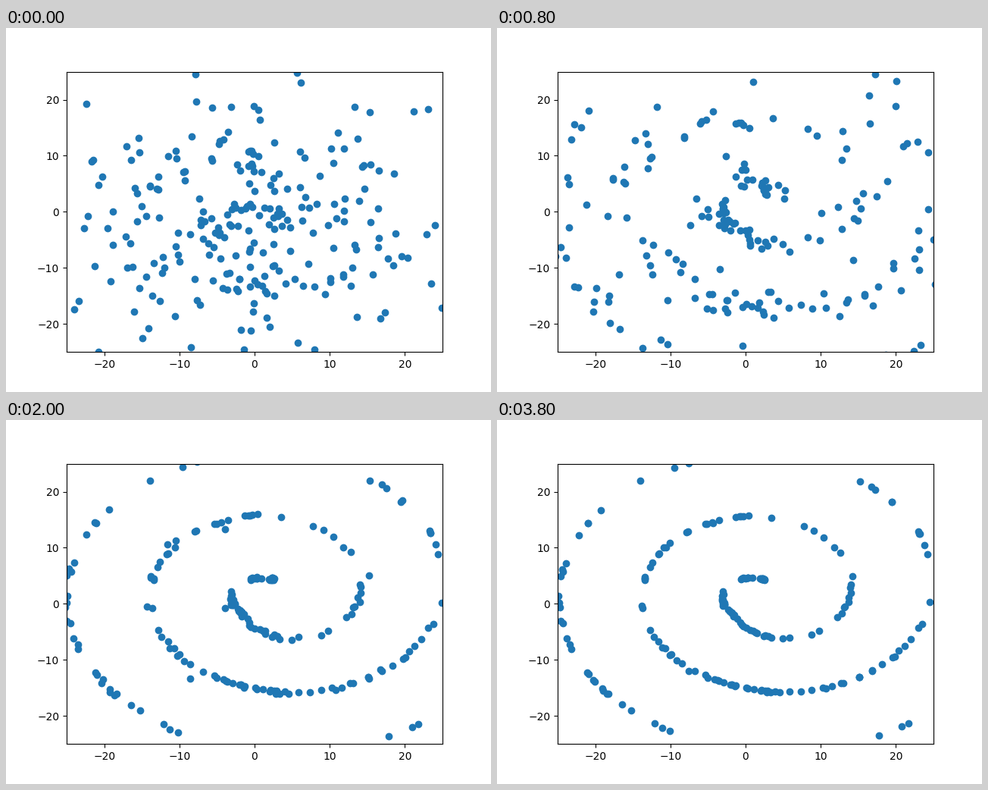
A matplotlib script for the animation above (4 s loop, 640 px wide and 480 px high).

```python
import numpy as np
import matplotlib.pyplot as plt
from matplotlib.animation import FuncAnimation

FRAMES, INTERVAL = 20, 200
COUNT, SIGMA = 250, 12.3


def spiral(n=1400):
    """Valley the dots settle in: a spiral with a skewed wobble in radius."""
    a = np.linspace(np.radians(59), 7.5 * np.pi, n)
    phi = a - np.radians(50)
    r = 10.9 * a / (2 * np.pi) - 0.5 + 4 * np.cos(phi + 0.27 * np.cos(phi))
    return np.column_stack([r * np.cos(a), r * np.sin(a)])


def pull(p, valley):
    """Force towards the nearest valley point, fading out on the ridge."""
    gap = valley[None] - p[:, None]
    d2 = (gap ** 2).sum(axis=2)
    best = d2.argmin(axis=1)
    rows = np.arange(len(p))
    d = np.sqrt(d2[rows, best]) + 1e-9
    size = 1.3 * np.clip(d / 2.6, 0, 1) * np.clip(5.6 - d, 0.3, 1)
    return gap[rows, best] * (size / d)[:, None]


def simulate():
    valley = spiral()
    p = np.random.default_rng(7).normal(0, SIGMA, (COUNT, 2))
    spread = np.clip((np.hypot(*p.T) - 4) / 7, 0, 1)[:, None]
    steps = [p]
    for k in range(FRAMES - 1):
        force = pull(p, valley)
        if k < 2:  # outward burst
            v = 0.13 * spread * p + 0.5 * (1 - spread) * force
        else:  # damped settling
            v = 0.5 * v + 0.85 * np.exp(-k / 6) * force
        p = p + v
        steps.append(p)
    return steps


steps = simulate()
fig, ax = plt.subplots(figsize=(6.4, 4.8), dpi=100)
ax.set(xlim=(-25, 25), ylim=(-25, 25))
dots, = ax.plot([], [], "o", color="#1f77b4")


def draw(k):
    dots.set_data(*steps[k].T)
    return dots,


anim = FuncAnimation(fig, draw, frames=FRAMES, interval=INTERVAL,
                     repeat=True, repeat_delay=0)
plt.show()
```
